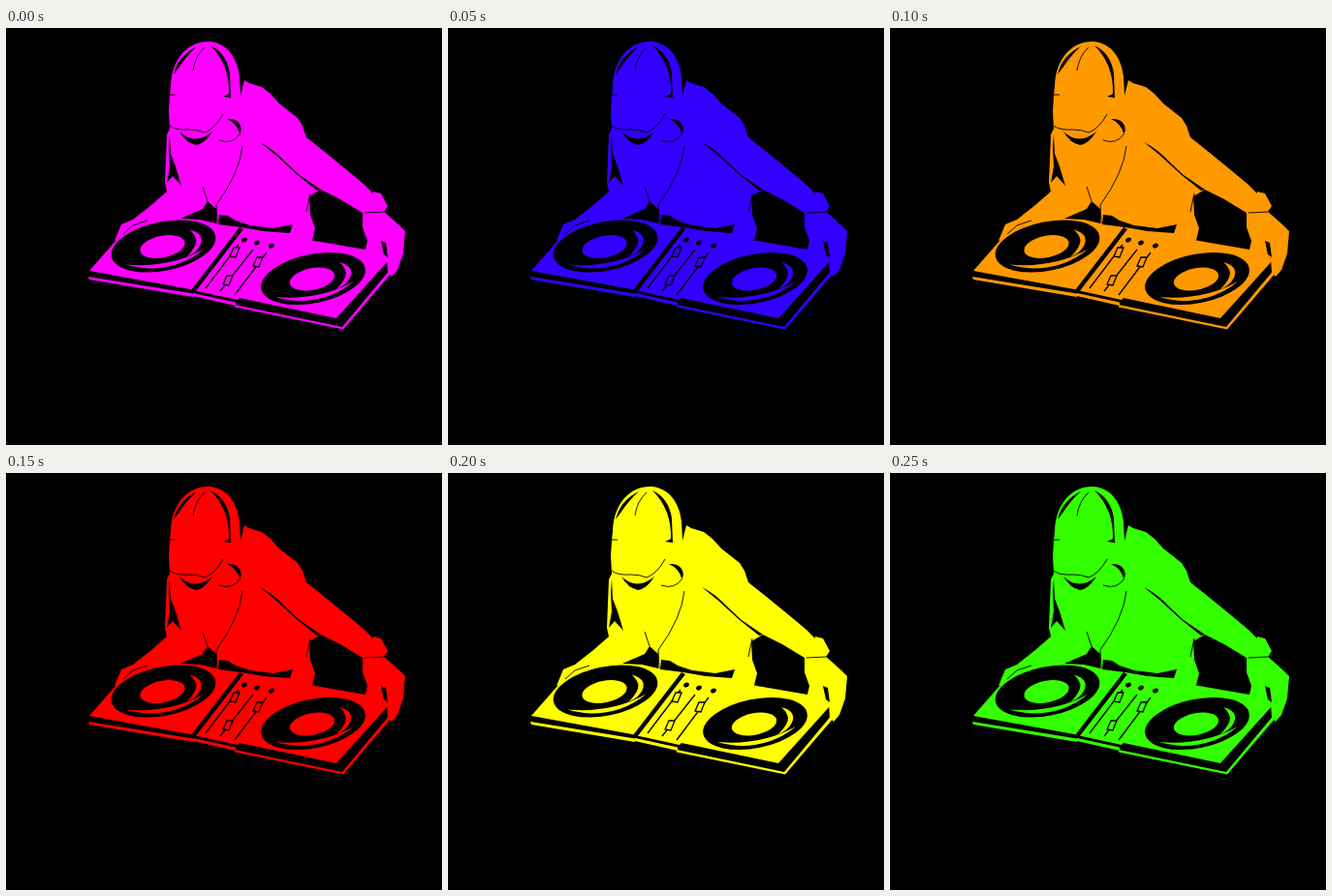
Animation of 450 by 431 pixels, one loop 300 ms. Source, as an HTML page with a canvas:

```html
<!DOCTYPE html>
<html lang="en">
<head>
<meta charset="utf-8">
<title>DJ</title>
<style>
html, body { margin: 0; width: 100%; height: 100%; overflow: hidden; background: #000; }
canvas { display: block; }
</style>
</head>
<body>
<canvas id="stage" width="450" height="431"></canvas>
<script>
const ctx = document.getElementById('stage').getContext('2d');
const COLORS = ['#ff00ff', '#3300ff', '#ff9900', '#ff0000', '#ffff00', '#33ff00'];
const STEP = 50;
const BLACK = '#000';

const body = new Path2D(`M169 104 L168 86 L169 70 L170 60 C171 32 187 14 209 14
  C229 15 239 32 241 50 L242 70 L246 54 L251 57 L264 61 L273 68
  L282 78 L301 93 L306 101 L310 113 L330 129 L352 147 L370 162 L379 171
  L379 169 L387 171 L394 184 L390 190 L396 195 L407 205 L412 210 L410 233
  L404 250 L398 257 L394 253 L393 238 L385 233 L316 222 L240 208 L170 205
  L112 220 L119 203 L131 198 L150 183 L166 169 L164 160 L166 110 Z`);

const deck = new Path2D(`M86 251 L121 211 L143 197 L180 197 L243 206 L300 214
  L386 232 L395 240 L341 300 L241 279 L239 281 L193 271 L190 270 Z`);

const rims = new Path2D(`M85 257 L193 274.5 L193 278 L86 260 Z
  M193 274 L237 283.5 L237 287 L193 277 Z
  M236 286 L347 309 L397 249 L399 252 L348 311.5 L236 288.5 Z`);

// Negative space around the torso, arms and clothing folds
const gaps = new Path2D(`
  M313 174 L325 167 L345 177 L368 191 L368 206 L373 220 L371 229 L316 219.5 L319 207 L314 193 Z
  M169 110 L170 130 L175 143 L181 163 L172 153 L166 160 L169 143 L168 124 Z
  M180 197 L203 187 L208 179 L217 187 L217 202 L200 198 Z
  M219 203 L220 193 L229 194 L237 199 L252 204 L276 207 L296 203 L293 212 L266 210 L243 206 Z
  M179 107 Q195 122 213 107 Q205 120 196 121 Q186 119 179 107 Z
  M228 94 Q239 93 242 101 Q244 107 241 109 Q239 99 228 94 Z
  M262 118 Q276 125 288 138 L303 152 L325 167 L321 168 L301 152 L278 131 Z
  M173 48 Q178 28 197 19 Q186 29 179 40 Z
  M211 18 Q228 26 231 47 L232 72 L224 71 L230 68 Q231 38 211 18 Z
  M387 220 L392 222 L394 237 L390 234 Z`);

const folds = new Path2D(`M169 101 Q175 106 189 105 Q198 105 205 108 Q216 104 224 89
  M205 20 Q195 29 193 44 M169 69 L175 69
  M220 116 Q234 121 242 109
  M244 122 Q241 150 217 183 L218 202 M203 164 L208 179
  M121 213 L131 204 L146 199
  M314 171 L310 190 M370 191 L390 190`);

const deckLines = new Path2D('M240 224 L206 269 M255 229 L221 272 M269 232 L236 276');
const seam = new Path2D('M241 206 L245 208 L195 273 L191 271 Z');
const shine = new Path2D(`M27 -17 Q43 -13 38 -1 Q34 7 24 11 Q34 1 34 -6 Q33 -12 27 -17 Z
  M-39 19 Q6 23 42 3 Q18 23 -15 23 Q-29 22 -39 19 Z`);

function fill(path, color) {
  ctx.fillStyle = color;
  ctx.fill(path);
}

function stroke(path, color, width) {
  ctx.strokeStyle = color;
  ctx.lineWidth = width;
  ctx.stroke(path);
}

function oval(x, y, rx, ry, color, tilt = -0.2) {
  ctx.fillStyle = color;
  ctx.beginPath();
  ctx.ellipse(x, y, rx, ry, tilt, 0, Math.PI * 2);
  ctx.fill();
}

function record(x, y, color) {
  ctx.save();
  ctx.translate(x, y);
  oval(0, 0, 54.7, 25.2, BLACK);
  oval(-1, 0.5, 23.5, 11.2, color);
  fill(shine, color);
  ctx.restore();
}

function fader(x, y, color) {
  const p = new Path2D(`M${x - 5} ${y + 4} L${x - 1} ${y - 5} L${x + 5} ${y - 5} L${x + 1} ${y + 5} Z`);
  fill(p, color);
  stroke(p, BLACK, 1.3);
}

function draw(color) {
  ctx.fillStyle = BLACK;
  ctx.fillRect(0, 0, 450, 431);
  fill(body, color);
  fill(deck, color);
  fill(rims, color);
  fill(gaps, BLACK);
  stroke(folds, BLACK, 0.9);
  fill(seam, BLACK);
  stroke(deckLines, BLACK, 1.3);
  for (const [x, y] of [[246, 219], [259, 222], [274, 225]]) {
    oval(x, y, 3, 2.3, BLACK, -0.5);
  }
  for (const [x, y] of [[236, 232], [260, 242], [229, 261]]) fader(x, y, color);
  record(162.5, 225.5, color);
  record(317, 259, color);
}

function tick() {
  draw(COLORS[Math.floor(performance.now() / STEP) % COLORS.length]);
  requestAnimationFrame(tick);
}
tick();
</script>
</body>
</html>
```
